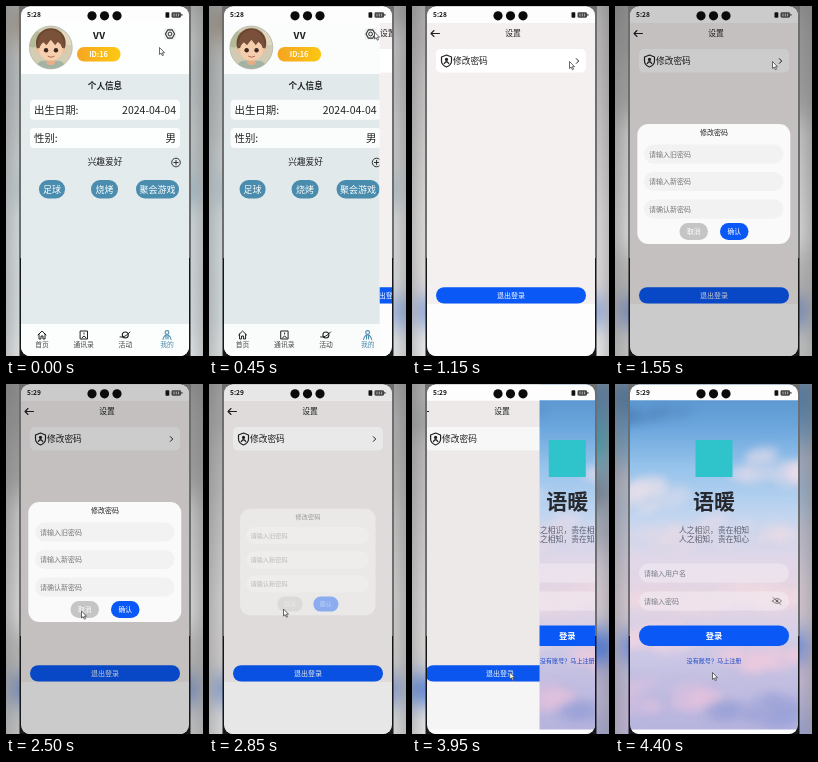
An HTML page with a canvas that plays this animation: 197 by 350 pixels, repeating every 4450 ms.

```html
<!DOCTYPE html>
<html lang="zh">
<head>
<meta charset="utf-8">
<style>
html, body { margin: 0; width: 100%; height: 100%; overflow: hidden; background: #999; }
canvas { display: block; width: 197px; height: 350px; }
</style>
</head>
<body>
<canvas id="stage"></canvas>
<script>
const W = 197, H = 350, LOOP = 4450, STEP = 50;
const LEFT = 15, RIGHT = 183;
const BLUE = '#0a59f7', INK = '#222', STEEL = '#4a8dae';
const FONT = '"Noto Sans CJK SC", "Noto Sans CJK", "Noto Sans", sans-serif';
const dpr = window.devicePixelRatio || 1;

function layer(el) {
  el.width = W * dpr;
  el.height = H * dpr;
  const c = el.getContext('2d');
  c.scale(dpr, dpr);
  return c;
}
const stage = layer(document.getElementById('stage'));
const phone = document.createElement('canvas');
const g = layer(phone);

const clamp = v => Math.max(0, Math.min(1, v));
const span = (t, a, b) => clamp((t - a) / (b - a));
const smooth = u => u * u * (3 - 2 * u);
const easeOut = u => 1 - (1 - u) ** 3;

function box(x, y, w, h, r, fill) {
  g.fillStyle = fill;
  g.beginPath();
  g.roundRect(x, y, w, h, r);
  g.fill();
}
function disc(x, y, r, fill) {
  g.fillStyle = fill;
  g.beginPath();
  g.arc(x, y, r, 0, 7);
  g.fill();
}
function ring(x, y, r, color, width = 1) {
  g.strokeStyle = color;
  g.lineWidth = width;
  g.beginPath();
  g.arc(x, y, r, 0, 7);
  g.stroke();
}
function line(d, color = INK, width = 1, x = 0, y = 0) {
  g.save();
  g.translate(x, y);
  g.strokeStyle = color;
  g.lineWidth = width;
  g.lineCap = g.lineJoin = 'round';
  g.stroke(new Path2D(d));
  g.restore();
}
function text(s, x, y, size, color = INK, align = 'center', weight = 400) {
  g.font = `${weight} ${size}px ${FONT}`;
  g.fillStyle = color;
  g.textAlign = align;
  g.textBaseline = 'alphabetic';
  g.fillText(s, x, y + size * 0.37);
}
function fade(c, x0, y0, x1, y1, stops) {
  const f = c.createLinearGradient(x0, y0, x1, y1);
  stops.forEach(([o, v]) => f.addColorStop(o, v));
  return f;
}

function avatar() {
  g.save();
  g.translate(44.8, 41.5);
  g.scale(1.1, 1.1);
  g.translate(-44, -42);
  g.save();
  g.beginPath();
  g.arc(44, 42, 19.5, 0, 7);
  g.clip();
  box(24, 22, 40, 40, 0, '#d3cdb4');
  disc(28, 34, 8, '#b5bb98');
  disc(61, 32, 8, '#e3d8bf');
  box(31, 54, 26, 12, 6, '#a3b3a4');
  box(40, 50, 8, 8, 3, '#e5b08a');
  disc(44, 38, 13.5, '#6b4630');
  disc(33, 45, 2.5, '#efc09c');
  disc(55, 45, 2.5, '#efc09c');
  g.fillStyle = '#f6cfae';
  g.beginPath();
  g.ellipse(44, 44.5, 10.5, 9.5, 0, 0, 7);
  g.fill();
  g.fillStyle = '#7a5139';
  g.fill(new Path2D('M32 43 Q32 26 45 26 Q56 27 56 43 L51 36 L48 40 L44 35 L40 40 L37 37Z'));
  disc(39.7, 44.5, 2, '#3c281f');
  disc(48.7, 44.5, 2, '#3c281f');
  line('M41.5 50 Q44 52 47 50', '#a65b48', 0.8);
  g.restore();
  ring(44, 42, 19.5, '#b5b6ab', 0.7);
  g.restore();
}

function gear() {
  box(158, 22, 12, 12, 3, '#f0f1f2');
  line('M161.7 23.9 H166.3 L168.6 28 L166.3 32.1 H161.7 L159.4 28Z', '#333', 1.1);
  ring(164, 28, 1.9, '#333');
}

function tabs() {
  box(LEFT, 318, 168, 32, 0, '#fcfdfd');
  line('M-4 0 L0 -4 L4 0 M-3 -1 V4 H-1 V1 H1 V4 H3 V-1', INK, 1, 36, 329);
  line('M-3.5 -4 H3.5 V4 H-3.5Z M-2 3 Q0 -1 2 3 M0 -2 V-1', INK, 1, 78, 329);
  ring(119.3, 329, 3, INK, 1.1);
  line('M-5 2 Q0 3 5 -3', INK, 1, 119, 329);
  ring(161, 326.5, 1.9, STEEL, 1.1);
  line('M-4 4.5 Q-3 0 0 0 Q3 0 4 4.5 M-1 1 V4 M1 1 V4', STEEL, 1.1, 161, 329);
  ['首页', '通讯录', '活动', '我的'].forEach((s, i) =>
    text(s, 36 + i * 41.7, 338.5, 6.8, i == 3 ? STEEL : '#444'));
}

function profile() {
  box(LEFT, 0, 168, H, 0, '#fdfefe');
  box(LEFT, 68, 168, 250, 0, '#e3ebed');
  avatar();
  text('vv', 93, 28.5, 11, INK, 'center', 700);
  box(71, 41, 43.5, 14.5, 7, fade(g, 71, 0, 114, 0, [[0, '#f6a522'], [1, '#fdc912']]));
  text('ID:16', 92.5, 48.2, 7.3, '#fff', 'center', 700);
  gear();
  text('个人信息', 99, 80, 8.6, INK, 'center', 700);
  [['出生日期:', '2024-04-04', 103.7], ['性别:', '男', 132]].forEach(([a, b, y]) => {
    box(24, y - 10, 150, 20, 4, '#fdfefe');
    text(a, 28, y, 10.4, INK, 'left');
    text(b, 170, y, 10.5, INK, 'right');
  });
  text('兴趣爱好', 99, 156, 8.7);
  ring(170, 156.5, 4.3, INK, 0.9);
  line('M-2.2 0 H2.2 M0 -2.2 V2.2', INK, 0.9, 170, 156.5);
  [['足球', 46, 26], ['烧烤', 98.5, 27], ['聚会游戏', 151.5, 43]].forEach(([s, x, w]) => {
    box(x - w / 2, 174, w, 18.5, 9, STEEL);
    text(s, x, 183.3, 9, '#fff');
  });
  tabs();
}

function settings() {
  box(-20, 0, 240, H, 0, '#fdfdfd');
  box(-20, 17, 240, 281, 0, '#f4f0ef');
  line('M4.5 0 H-4 M-1 -3 L-4 0 L-1 3', INK, 1.1, 23, 27.5);
  text('设置', 101, 27.3, 7.8, INK, 'center', 500);
  box(24, 43, 150, 23.5, 5, '#fff');
  line('M0 -6 L5 -4 V0 Q5 4 0 6 Q-5 4 -5 0 V-4Z', INK, 1.2, 34.5, 55);
  disc(34.5, 53.4, 1.6, INK);
  line('M-2.2 2.5 Q0 -1 2.2 2.5', INK, 1.4, 34.5, 55);
  text('修改密码', 41, 55, 8.7, INK, 'left', 500);
  line('M-1.2 -2.4 L1.2 0 L-1.2 2.4', INK, 1, 165.5, 55);
  box(24, 281.2, 150, 16.4, 8.2, BLUE);
  text('退出登录', 99, 289.3, 7, '#fff', 'center', 500);
}

function dialog(p) {
  if (p <= 0) return;
  box(LEFT, 0, 168, H, 0, `rgba(0,0,0,${0.2 * p})`);
  g.save();
  g.globalAlpha = p;
  const k = 0.8 + 0.2 * p;
  g.translate(98.8, 178);
  g.scale(k, k);
  g.translate(-98.8, -178);
  box(22.3, 118, 153, 120, 11, '#fafafa');
  text('修改密码', 99, 126.3, 7);
  ['请输入旧密码', '请输入新密码', '请确认新密码'].forEach((s, i) => {
    const y = 148 + i * 27.5;
    box(29, y - 9.5, 139.5, 19, 9.5, '#f2f2f2');
    text(s, 34, y, 7, '#777', 'left');
  });
  box(64.5, 217, 28.5, 17, 8.5, '#c5c5c5');
  text('取消', 78.7, 225.5, 6.8, '#fff');
  box(105, 217, 28.5, 17, 8.5, BLUE);
  text('确认', 119.2, 225.5, 6.8, '#fff', 'center', 500);
  g.restore();
}

// Soft cloudscape painted once
const sky = document.createElement('canvas');
(function paintSky() {
  const c = layer(sky);
  c.fillStyle = fade(c, 0, 0, 0, H, [
    [0, '#5590cc'], [0.12, '#6aa5dc'], [0.24, '#97c4ec'], [0.38, '#c3d6f0'], [0.5, '#e0d7e8'],
    [0.62, '#e6d5e3'], [0.72, '#d3cfe8'], [0.84, '#c3bfe2'], [1, '#b5b3de']
  ]);
  c.fillRect(0, 0, W, H);
  let seed = 11;
  const rnd = () => (seed = seed * 16807 % 2147483647) / 2147483647;
  const puffs = (x, y, w, h, n, color) => {
    c.fillStyle = color;
    for (let i = 0; i < n; i++) {
      const u = rnd() * 2 - 1, r = 3 + rnd() * 7;
      c.beginPath();
      c.ellipse(x + u * w, y + (rnd() - 0.5) * h * (1 - u * u), r * 2, r, -0.2, 0, 7);
      c.fill();
    }
  };
  c.filter = `blur(${4 * dpr}px)`;
  puffs(40, 32, 40, 16, 8, 'rgba(70,115,170,.25)');
  puffs(160, 88, 32, 40, 16, 'rgba(238,222,234,.4)');
  puffs(30, 112, 28, 26, 12, 'rgba(236,224,236,.4)');
  puffs(100, 150, 90, 30, 24, 'rgba(240,222,230,.3)');
  puffs(100, 212, 90, 34, 24, 'rgba(246,220,224,.3)');
  puffs(40, 255, 36, 24, 16, 'rgba(246,216,228,.4)');
  puffs(150, 272, 40, 30, 18, 'rgba(244,206,222,.4)');
  puffs(50, 312, 50, 30, 18, 'rgba(228,196,224,.35)');
  puffs(150, 326, 50, 24, 18, 'rgba(150,160,214,.3)');
})();

function login() {
  g.drawImage(sky, 0, 0, W, H);
  box(80.5, 56, 37, 37, 0, '#2fc3cb');
  text('语暖', 99, 117, 21, '#26282d', 'center', 700);
  text('人之相识，贵在相知', 99, 146, 7.8, '#5b6070');
  text('人之相知，贵在知心', 99, 155.5, 7.8, '#5b6070');
  [['请输入用户名', 189], ['请输入密码', 217]].forEach(([s, y]) => {
    box(24, y - 9.5, 150, 19, 9.5, 'rgba(246,240,246,.5)');
    text(s, 29, y, 7, '#777b88', 'left');
  });
  line('M-4.5 0 Q0 -5 4.5 0 Q0 5 -4.5 0Z M-4 -3.5 L4 3.5', '#666', 0.8, 162, 217);
  disc(162, 217, 1.3, '#666');
  box(24, 241.5, 150, 20.5, 10, BLUE);
  text('登录', 99, 251.8, 8.3, '#fff', 'center', 700);
  text('没有账号？马上注册', 99, 276.7, 6.1, '#1746c8', 'center', 500);
}

// New page slides in at half the speed of its leading edge
function push(from, to, p) {
  if (p < 1) {
    g.save();
    g.translate(-33 * p, 0);
    from();
    g.restore();
    box(LEFT, 0, 168, H, 0, `rgba(0,0,0,${0.1 * p})`);
  }
  if (p > 0) {
    const off = (RIGHT - LEFT) * (1 - p);
    g.save();
    g.beginPath();
    g.rect(LEFT + off, 0, 170, H);
    g.clip();
    g.translate(off / 2, 0);
    to();
    g.restore();
  }
}

// White system strips stay in place above every page
function strips() {
  box(LEFT, 0, 168, 16.3, 0, '#fdfdfd');
  box(LEFT, 345.5, 168, 5, 0, '#fdfdfd');
}

function statusBar(t) {
  text(t < 2300 ? '5:28' : '5:29', 21, 8.8, 6.6, '#111', 'left', 700);
  [86, 98.5, 111].forEach(x => disc(x, 9.8, 4.6, '#0b0b0b'));
  box(159.5, 6.3, 3.8, 5.4, 0.8, '#111');
  box(165.5, 6.3, 9.5, 5.4, 1.4, '#444');
  box(175.4, 7.8, 1, 2.2, 0.5, '#444');
  line('M168 8 V10 M170.3 8 V10 M172.6 8 V10', '#ddd', 0.7);
}

const path = [
  [0, 153.5, 41.5], [350, 165.5, 26], [700, 165.5, 26], [1100, 157.5, 55.5],
  [1650, 157.5, 55.5], [2200, 76, 226], [2500, 75.5, 227], [2850, 74.5, 225],
  [3000, 74.5, 225], [3450, 98, 288], [LOOP, 97.5, 288.5]
];
function cursor(t) {
  const i = Math.max(1, path.findIndex(k => k[0] > t));
  const [a, x, y] = path[i - 1], [b, u, v] = path[i];
  const e = smooth(span(t, a, b));
  g.save();
  g.translate(x + (u - x) * e, y + (v - y) * e);
  const arrow = new Path2D('M0 0 V7 L1.7 5.6 L2.8 8.2 L4 7.7 L2.9 5.2 H5Z');
  g.fillStyle = '#fff';
  g.strokeStyle = '#444';
  g.lineWidth = 0.8;
  g.fill(arrow);
  g.stroke(arrow);
  g.restore();
}

function draw(t) {
  g.clearRect(0, 0, W, H);
  box(13, 0, 172, 252, 0, '#6c6e70');
  box(13.5, 252, 171, 98, 0, '#161718');
  g.save();
  g.beginPath();
  g.roundRect(LEFT, 0.5, 168, 349.5, 9);
  g.clip();
  const out = easeOut(span(t, 3900, 4300));
  if (out > 0) push(settings, login, out);
  else push(profile, settings, easeOut(span(t, 440, 840)));
  strips();
  if (t < 2800) dialog(easeOut(span(t, 1200, 1500)));
  else dialog(1 - span(t, 2770, 2910));
  statusBar(t);
  cursor(t);
  g.restore();

  // Enlarged, blurred and shaded copy behind the handset
  stage.fillStyle = '#a5a8aa';
  stage.fillRect(0, 0, W, H);
  stage.filter = `blur(${12 * dpr}px)`;
  stage.drawImage(phone, 13 * dpr, 0, 172 * dpr, H * dpr, -3, -25, 203, 400);
  stage.filter = 'none';
  stage.fillStyle = fade(stage, 0, 0, 0, H, [[0, 'rgba(0,0,0,.25)'], [0.6, 'rgba(0,0,0,.08)'], [1, 'rgba(0,0,0,.04)']]);
  stage.fillRect(0, 0, W, H);
  stage.drawImage(phone, 13 * dpr, 0, 172 * dpr, H * dpr, 13, 0, 172, H);
}

const start = performance.now();
function tick() {
  const t = (performance.now() - start) % LOOP;
  draw(Math.floor(t / STEP) * STEP);
  requestAnimationFrame(tick);
}
tick();
</script>
</body>
</html>
```
